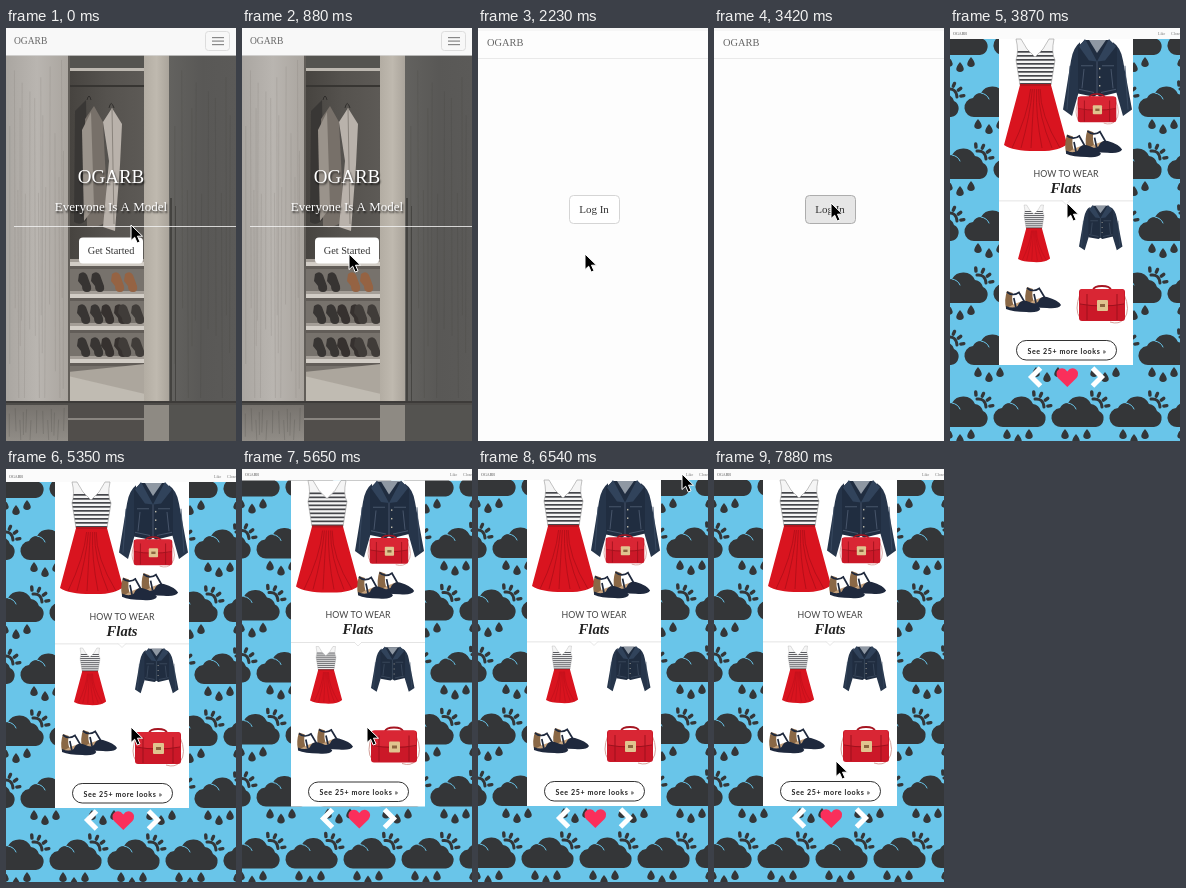
Animation, 230 px wide and 413 px high, one loop 8000 ms. Source, as an HTML page with a canvas:

```html
<!DOCTYPE html>
<html lang="en">
<head>
<meta charset="utf-8">
<title>Outfit picker</title>
<style>
html, body { margin: 0; width: 100%; height: 100%; overflow: hidden; background: #fff; }
canvas { display: block; width: 230px; height: 413px; }
</style>
</head>
<body>
<canvas id="stage"></canvas>
<script>
const W = 230, H = 413, LOOP = 8000;
const canvas = document.getElementById('stage');
const c = canvas.getContext('2d');
const ratio = window.devicePixelRatio || 1;
canvas.width = W * ratio;
canvas.height = H * ratio;

const SERIF = '"Liberation Serif", serif';
const SANS = 'Lato, sans-serif';
const BRAND = 'OGARB';
const SKY = '#69c5e9';

// time, x, y of the pointer tip; each pose holds until the next
const POINTER = [
  [0, 125, 197], [150, 118, 211], [290, 110, 223], [440, 107, 228],
  [740, 106, 227], [880, 107, 226],
  [2830, 125, 212], [2980, 134, 190], [3120, 117, 175],
  [4020, 118, 184], [4160, 121, 203], [4310, 126, 226], [4460, 128, 244],
  [4610, 127, 255], [4750, 126, 259], [4900, 125, 258],
  [5800, 139, 214], [5950, 168, 123], [6090, 195, 41], [6240, 205, 7],
  [6540, 204, 5], [6690, 206, 3], [6990, 206, 2],
  [7740, 133, 246], [7880, 122, 292]
];

const held = (keys, t) => keys.filter(k => k[0] <= t).pop();

// the page settles back after being pulled down
function bounceAt(t) {
  const step = Math.floor((t - 5350) / 145);
  return step < 0 || step > 2 ? 0 : 2 * Math.pow(0.5, step);
}

function box(x, y, w, h, fill) {
  c.fillStyle = fill;
  c.fillRect(x, y, w, h);
}

function round(x, y, w, h, r, fill, stroke) {
  c.beginPath();
  c.roundRect(x, y, w, h, r);
  if (fill) { c.fillStyle = fill; c.fill(); }
  if (stroke) { c.strokeStyle = stroke; c.lineWidth = 1; c.stroke(); }
}

function shape(d, fill, stroke, width = 1) {
  const p = new Path2D(d);
  if (fill) { c.fillStyle = fill; c.fill(p); }
  if (stroke) { c.strokeStyle = stroke; c.lineWidth = width; c.stroke(p); }
}

function text(s, x, y, font, fill, align = 'left') {
  c.font = font;
  c.fillStyle = fill;
  c.textAlign = align;
  c.fillText(s, x, y);
}

function at(x, y, sx, sy, draw) {
  c.save();
  c.translate(x, y);
  c.scale(sx, sy);
  draw();
  c.restore();
}

function fade(x0, y0, x1, y1, ...colors) {
  const g = c.createLinearGradient(x0, y0, x1, y1);
  colors.forEach((col, i) => g.addColorStop(i / (colors.length - 1), col));
  return g;
}

function grain(x, w, y, h, color, n) {
  c.strokeStyle = color;
  c.lineWidth = 0.7;
  for (let i = 0; i < n; i++) {
    const gx = x + (i + 0.5) * w / n + Math.sin(i * 7.3) * 1.5;
    const top = y + (Math.sin(i * 4.1) + 1) * h * 0.2;
    c.beginPath();
    c.moveTo(gx, top);
    c.lineTo(gx + Math.sin(i), Math.min(y + h, top + h * 0.7));
    c.stroke();
  }
}

function shoePair(x, y, color) {
  for (const dx of [0, 13]) {
    shape(`M${x + dx} ${y + 2}q5-4 8 1l4 11q1 6-4 6q-5 0-5-6l-4-5z`, color);
  }
}

function wardrobe() {
  box(0, 27, 62, 346, fade(0, 0, 62, 0, '#aaa6a1', '#b9b5b0', '#aaa59f'));
  grain(2, 58, 30, 340, 'rgba(112,106,101,.25)', 17);
  box(62, 27, 77, 346, '#5c5955');
  box(62, 27, 77, 13, '#555450');
  box(62, 40, 77, 3, '#bdb8b0');
  box(62, 43, 77, 191, fade(62, 0, 139, 0, '#46433f', '#55524e', '#5d5a56'));
  box(62, 57, 77, 2, '#373532');
  shape('M69 83L80 72L82 190Q75 199 68 194z', '#393735');
  shape('M79 91L88 78L97 94L102 192Q91 202 81 198z', '#777069');
  shape('M76 102L85 84L88 180L78 193z', '#9a938b');
  shape('M97 94L106 80L116 96L114 137L109 203L97 199L103 133z', '#b9b2ab');
  shape('M106 80L108 196', null, '#8a847d', 1);
  shape('M81 72q2-8 4 0M103 80q2-9 5 0', null, '#302e2c', 1);

  box(62, 234, 77, 139, '#77726c');
  for (const y of [234, 266, 298, 331]) {
    box(62, y - 3, 77, 3, '#a49e97');
    box(62, y, 77, 4, '#d2cdc6');
    box(62, y + 4, 77, 3, '#625d58');
  }
  shoePair(73, 244, '#373432');
  shoePair(106, 244, '#956343');
  for (const y of [276, 309]) {
    shoePair(72, y, '#383533');
    shoePair(96, y, '#36312f');
    shoePair(113, y, '#403c39');
  }
  shape('M62 344L139 336V373H62z', '#aca69d');
  shape('M62 348L139 366V373H62z', '#c0bbb2');
  box(62, 27, 2, 346, '#625e59');

  box(138, 27, 25, 346, fade(138, 0, 163, 0, '#b3ada3', '#bfb9af', '#aaa49b'));
  box(163, 27, 67, 346, fade(163, 0, 230, 0, '#63625f', '#595856', '#5b5a58'));
  grain(166, 62, 30, 340, 'rgba(42,42,41,.17)', 11);
  box(164, 170, 2, 203, '#444340');
  box(169, 178, 1, 195, '#464542');

  box(0, 373, W, 40, '#4e4c49');
  box(0, 377, 62, 36, fade(0, 377, 0, 413, '#77736e', '#918d87'));
  grain(1, 60, 379, 33, 'rgba(65,62,59,.3)', 13);
  box(62, 377, 77, 36, '#514e4b');
  box(62, 390, 77, 2, '#898580');
  box(138, 377, 25, 36, '#8e8a83');
  box(163, 377, 67, 36, '#545350');
  box(0, 373, W, 2, '#3d3b39');
}

function home() {
  wardrobe();
  box(0, 0, W, 27, '#f8f8f8');
  box(0, 27, W, 0.7, '#dedede');
  text(BRAND, 8, 15.5, `9.5px ${SERIF}`, '#666');
  round(199.5, 3.5, 24, 19, 3, null, '#ddd');
  for (const y of [9, 12.5, 16]) box(206, y, 12, 1.2, '#888');

  c.save();
  c.shadowColor = 'rgba(0,0,0,.75)';
  c.shadowOffsetX = ratio;
  c.shadowOffsetY = 1.5 * ratio;
  c.shadowBlur = 2 * ratio;
  text(BRAND, 105, 155, `19px ${SERIF}`, '#fff', 'center');
  text('Everyone Is A Model', 105, 183, `13px ${SERIF}`, '#fff', 'center');
  c.restore();
  box(8, 198, 222, 1, 'rgba(245,245,245,.8)');
  round(73, 209.5, 64, 26, 4, '#fff');
  text('Get Started', 105, 225.5, `10.3px ${SERIF}`, '#333', 'center');
}

function login(pressed) {
  box(0, 0, W, H, '#fdfdfd');
  box(0, 0, W, 3, '#f6f6f6');
  box(0, 30, W, 1, '#e9e9e9');
  text(BRAND, 9, 17.5, `10.4px ${SERIF}`, '#666');
  round(91.5, 167.5, 50, 28, 4, pressed ? '#e6e6e6' : '#fff', pressed ? '#adadad' : '#d5d5d5');
  text('Log In', 116, 184.5, `11px ${SERIF}`, '#333', 'center');
}

function cloud() {
  const dark = '#343638';
  c.lineCap = 'round';
  shape('M15-12q8-1 9 8', null, dark, 3);
  for (let i = 0; i < 4; i++) {
    const a = -1.65 + i * 0.5, dx = Math.cos(a), dy = Math.sin(a);
    shape(`M${15 + dx * 13} ${-3 + dy * 13}L${15 + dx * 16} ${-3 + dy * 16}`, null, dark, 3.4);
  }
  shape('M-16 16A9.5 9.5 0 0 1-18-3A9 9 0 0 1-10-8A13 13 0 0 1 13-7A10 10 0 0 1 21 0A8.5 8.5 0 0 1 18 16z', dark);
  shape('M-10-8Q-4-7-2-2', null, SKY, 1);
  for (const [x, y] of [[-13, 21], [-2, 26], [9, 21]]) {
    shape(`M${x} ${y - 3}q7.5 9 0 10q-7.5-1 0-10z`, dark);
  }
}

function rain() {
  box(0, 11, W, H, SKY);
  for (let row = 0; row < 7; row++) {
    const shift = row % 2 ? -17 : 12;
    for (let i = 0; i < 5; i++) at(shift + i * 58, 11 + row * 62, 1, 1, cloud);
  }
}

// garments are drawn in local units and scaled into place
function dress() {
  const top = 'M12 0L17 0Q22 11 31 18Q40 11 45 0L50 0Q47 14 51 21L47 46H16L12 21Q15 12 12 0z';
  shape(top, '#f5f5f5');
  c.save();
  c.clip(new Path2D(top));
  for (let y = 12; y < 47; y += 4) box(10, y, 44, 1.7, '#45464b');
  c.restore();
  shape(top, null, '#999', 0.6);
  shape('M16 46H47L63 105Q55 113 31 112Q9 112 0 106z', '#d9141f');
  for (const x of [8, 17, 27, 38, 48, 56]) {
    shape(`M${25 + x / 5} 50Q${22 + x / 4} 76 ${x} 109`, null, '#b30f19', 0.9);
  }
  box(16, 45, 31, 2, '#b5161e');
}

function jacket() {
  shape('M17 3Q10 8 8 20L0 66L9 72L18 42zM50 3Q58 8 60 20L69 66L60 72L51 42z', '#26354a');
  shape('M22 1L46 1L54 7L54 50L37 54L34 52L31 54L15 51L15 7z', '#202d40');
  shape('M26 1L34 13L43 1z', '#8f98a3');
  shape('M22 0L34 21L26 20L16 7zM46 0L34 21L42 20L53 7z', '#31435b');
  shape('M34 21V52M18 25H30M39 25H51M16 47L31 50M38 50L53 47M21 28L19 46M48 28L50 46', null, '#56657a', 0.7);
  shape('M7 25L4 66M62 25L65 66', null, '#3d4e65', 0.8);
  for (const y of [27, 35, 43]) box(36, y, 1.4, 1.4, '#bdb9a9');
}

function bag() {
  shape('M16 4Q17 0 25 0Q33 0 34 4', null, '#a51420', 2);
  shape('M3 8Q-3 24 3 32M47 8Q54 24 47 33Q42 39 33 36', null, '#d5a09a', 1);
  round(2, 3, 46, 32, 3, '#cb1828');
  round(3, 3, 44, 16, 3, '#d92634');
  shape('M3 18Q25 22 47 18M10 8V34M40 8V34', null, '#9d111d', 1);
  round(20, 14, 11, 11, 1, '#e0c48f');
  box(23, 18, 5, 3, '#8d6640');
}

function flat() {
  const navy = '#1f293d';
  shape('M2 2Q-1 11 1 19L10 20Q6 11 8 4z', '#8a6846');
  shape('M2 19Q10 14 18 12L22 18L10 21z', '#c6a27c');
  shape('M1 17Q8 20 13 17Q15 11 22 12Q33 15 36 20Q34 24 22 23Q8 23 1 20z', navy);
  shape('M2 3Q8 8 15 3M14 3L20 13M9 9L11 18', null, navy, 1.7);
}

function flats() {
  at(20, -1, 1, 1, flat);
  at(0, 3, 0.98, 1, flat);
}

function looks(bounce) {
  c.save();
  c.translate(0, bounce);
  rain();
  box(49, 11, 134, 326, '#fff');
  box(0, -3, W, 14, '#fbfbfb');
  text(BRAND, 3, 6.5, `4px ${SERIF}`, '#555');
  text('Like', 208, 6.5, `4px ${SERIF}`, '#777');
  text('Closet', 221, 6.5, `4px ${SERIF}`, '#777');

  at(54, 11, 1, 1, dress);
  at(113, 11, 1, 1.07, jacket);
  at(126, 66, 0.84, 0.81, bag);
  at(115, 101, 1.02, 1.08, flats);
  text('HOW TO WEAR', 116, 148.5, `8.8px ${SANS}`, '#444', 'center');
  text('Flats', 116, 164.5, `italic bold 14.6px ${SERIF}`, '#222', 'center');
  box(49, 172.5, 134, 0.8, '#dedede');
  shape('M112 172.5L116 176.5L120 172.5', '#fff', '#ddd', 0.7);

  at(68, 177, 0.51, 0.51, dress);
  at(129, 177, 0.63, 0.63, jacket);
  at(55, 258, 1, 1, flats);
  at(127, 258, 1, 1, bag);
  round(66.5, 312.5, 100, 19.5, 9.7, '#fff', '#333');
  c.letterSpacing = '0.6px';
  text('See 25+ more looks »', 117, 325.7, `bold 7.1px ${SANS}`, '#222', 'center');
  c.letterSpacing = '0px';

  shape('M90.5 340L81.5 349L90.5 358', null, '#fff', 5);
  shape('M142.5 340L151.5 349L142.5 358', null, '#fff', 5);
  shape('M117.3 359L108 350Q104.5 345 108.5 341.5Q113.5 338 117.3 343.5Q121 338 126 341.5Q130 345 126.5 350z', '#fa2f5b');
  c.restore();
}

function pointer(x, y) {
  at(x, y, 1, 1, () => {
    shape('M0 0V15.5L3.7 12.2L6.2 18L9 16.8L6.5 11.2H11.5z', '#000', '#fff', 1);
  });
}

function draw(t) {
  c.setTransform(ratio, 0, 0, ratio, 0, 0);
  c.clearRect(0, 0, W, H);
  if (t < 2230) home();
  else if (t < 3870) login(t >= 3420);
  else looks(bounceAt(t));
  const [, x, y] = held(POINTER, t);
  pointer(x, y);
}

const start = performance.now();
function tick() {
  draw((performance.now() - start) % LOOP);
  requestAnimationFrame(tick);
}
tick();
</script>
</body>
</html>
```
